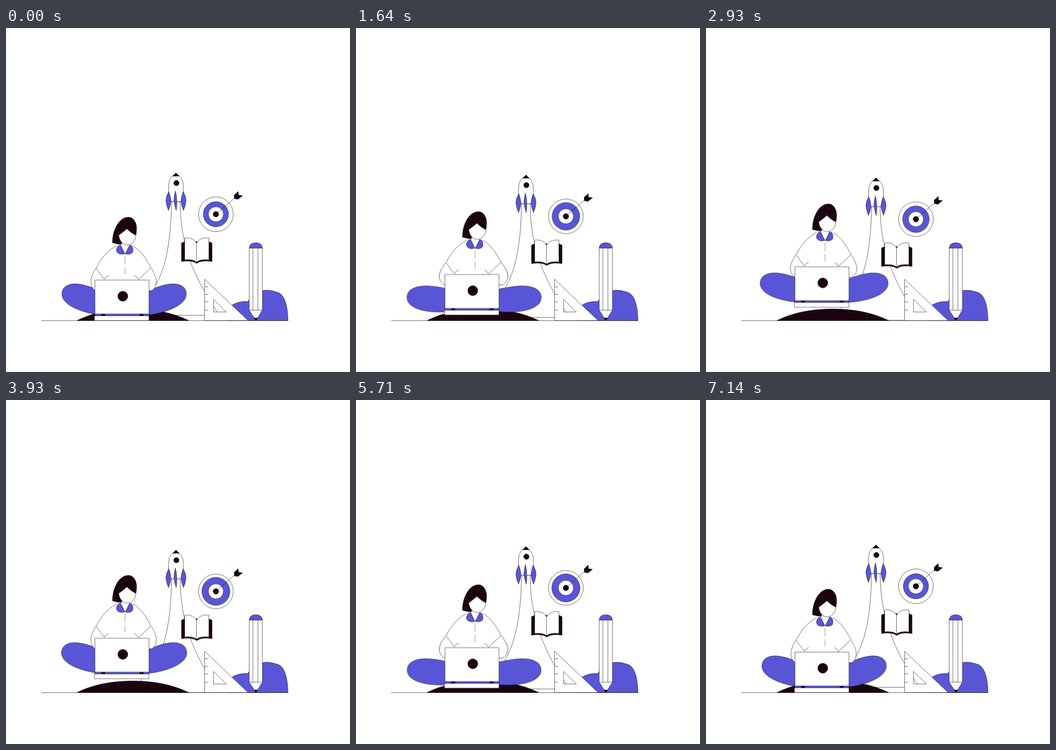
Animation of 640 by 640 pixels, one loop 7210 ms. Source, as an HTML page:

```html
<!DOCTYPE html>
<html lang="en">
<head>
<meta charset="utf-8">
<title>Learning scene</title>
<style>
  html, body { margin: 0; width: 100%; height: 100%; overflow: hidden; background: #fff; }
  svg { display: block; width: 100%; height: 100%; }
  svg { fill: #fff; stroke: #120a10; stroke-width: .6; stroke-linejoin: round; }
  .ink { fill: #1b0410; }
  .blue { fill: #5856d6; }
  .line { fill: none; }
  .person, .air, .leg, .forearm, .ring { animation: 3605ms infinite alternate; }
  .person, .air { animation-timing-function: cubic-bezier(.56, 0, .44, 1); }
  .leg, .forearm { animation-duration: 1802.5ms; }
  .ring { animation-duration: 1201.67ms; }
  .leg, .forearm, .ring { animation-timing-function: cubic-bezier(.37, 0, .63, 1); }
  .person { animation-name: rise; }
  .air { animation-name: sink; }
  .leg { animation-name: swing; transform-origin: 192px 544px; }
  .forearm { animation-name: spread; transform-origin: 167px 470px; }
  .ring { animation-name: pulse; transform-origin: 390.5px 346.5px; }
  @keyframes rise { to { transform: translateY(-26px); } }
  @keyframes sink { to { transform: translateY(9.6px); } }
  @keyframes swing { to { transform: rotate(-13deg); } }
  @keyframes spread { to { transform: scaleX(1.35); } }
  @keyframes pulse { to { transform: scale(1.137); } }
</style>
</head>
<body>
<svg viewBox="0 0 640 640">
  <defs>
    <path id="fin" d="M303 304.5Q297.5 313 297.5 321.5Q298.5 331 302.3 339.5Q306 331 307 322Q306 312 303 304.5Z"/>
    <path id="limb" d="M195 498C165 484 146 476 127 476C112 476.500 104 484 104 495C104 512 130 526 165 532.500L195 537Z"/>
    <path id="arm" d="M167 447C162 456 158 464 158 472C158 480 161 485 166 488.500L186 489V468"/>
  </defs>

  <!-- rocket, book and target -->
  <g class="air">
    <path d="M308 323C307 395 298 475 252 509V534.500H397C347 462 324 400 324 323Z"/>
    <path d="M309.500 275.500Q302.500 283 302.500 293V307L306.500 323H326L330 307V293Q330 283 322.500 275.500Z"/>
    <path class="ink" d="M316.200 269.500L322.300 275.500H310Z"/>
    <circle class="ink" cx="317" cy="288.500" r="5"/>
    <g class="blue">
      <use href="#fin"/>
      <use href="#fin" transform="translate(632.500) scale(-1 1)"/>
      <path d="M315.200 303Q312.500 312 312.500 321Q313.500 331 316.700 339.500Q318.200 330 317.700 321Q317.300 311 315.200 303Z"/>
    </g>

    <path class="ink" d="M326.500 400L332.500 397.500H377.500L383.300 400V434.500Q364 431.500 354.800 438Q346 431.500 326.500 434.500Z"/>
    <path d="M354.500 400.500C350 391.500 341 390 332.500 390.700V431.300Q347 429.700 354.500 435.300Q362 429.700 377.500 431.300V390.700C368 390 359 391.500 354.500 400.500V435"/>

    <circle cx="390.500" cy="346.500" r="32.300"/>
    <circle class="ring blue" cx="390.500" cy="346.500" r="23.400"/>
    <circle cx="390.500" cy="346.500" r="14"/>
    <circle class="ink" cx="390.500" cy="346.500" r="5.200"/>
    <path class="line" d="M390.500 346.500L427 314.500"/>
    <path class="ink" d="M424.500 311L432 304.300L432.500 310.800L440 312L431.500 318.700L424.800 317.500Z"/>
  </g>

  <!-- ground -->
  <path class="ink" d="M132 544.300C162 529 198 522.700 236 522.700C274 522.700 309 529 340 544.300Z"/>
  <path class="blue" d="M412 544.300V528Q417 517 423 514Q435 508 450 509Q460 490 478 488.500Q489 486 506 492C519 496.500 524.500 519 524.500 544.300Z"/>
  <path fill-rule="evenodd" d="M369.500 467.500V544.300H450.500ZM386 505V528.300H410Z"/>
  <path class="line" d="M369.500 481.500H376M369.500 495.500H376M369.500 509.500H376M369.500 525H376"/>

  <!-- pencil -->
  <path d="M452.500 409H477V525L465 544.300L452.500 525Z"/>
  <path class="blue" d="M452.500 409.500Q453 399.500 464.700 399.500Q476.500 399.500 477 409.500Z"/>
  <path class="line" d="M459.300 409V525M468.700 409V525M452.500 525H477"/>
  <path class="ink" d="M461.500 539.500H468L465 544.300Z"/>
  <path class="line" d="M65.500 544.500H525"/>

  <!-- woman with laptop -->
  <g class="person">
    <use class="leg blue" href="#limb"/>
    <g transform="translate(439.500) scale(-1 1)"><use class="leg blue" href="#limb"/></g>
    <use class="forearm" href="#arm"/>
    <g transform="translate(437.500) scale(-1 1)"><use class="forearm" href="#arm"/></g>
    <path stroke="none" d="M206 405C188 415 178 427 167.500 447L183 468V490H254V466L246.500 468L270 446C259 427 252 415 236 405Z"/>
    <path class="line" d="M206 405C188 415 178 427 167.500 447L183 467.500Q186 462 191 460.500M236 405C252 415 259 427 270 446L246.500 468Q243 462 239 460.500"/>
    <path class="line" stroke-width=".4" d="M221.500 424V440M221.500 445V458.500"/>

    <path class="ink" d="M198 399.500C198 376 210 352 228 352C237 352 243 362 243 373Q243 380 241.500 386L216.500 403Q206 402 198 399.500Z"/>
    <path d="M215 400L213.500 405L221.500 421L230 405L229 399Z"/>
    <path d="M209.700 385.500Q217 380.500 225 373.500Q232 381 241.500 385.500C241 397 233 404 225 403.500C217 403 211 396 209.700 385.500Z"/>
    <path class="blue" d="M210 404.500C206 408 204.500 413 206.500 417C210 421.500 217 422 221 419.500C217 414 216 407 213 404.500ZM233 404.500C236 407 237 413 235.500 417.500C231 421.500 226 422 222 419.500C226 415 227 408 230 404.500Z"/>

    <path class="blue" d="M165.500 525H266V536H165.500Z"/>
    <path class="ink" d="M177.500 532H184V535.500H177.500ZM249 532H255.500V535.500H249Z"/>
    <path d="M165.500 469H266V532H165.500ZM164.500 535.500H266V544.300H164.500Z"/>
    <circle class="ink" cx="217.300" cy="499" r="9.300"/>
  </g>
</svg>
</body>
</html>
```
